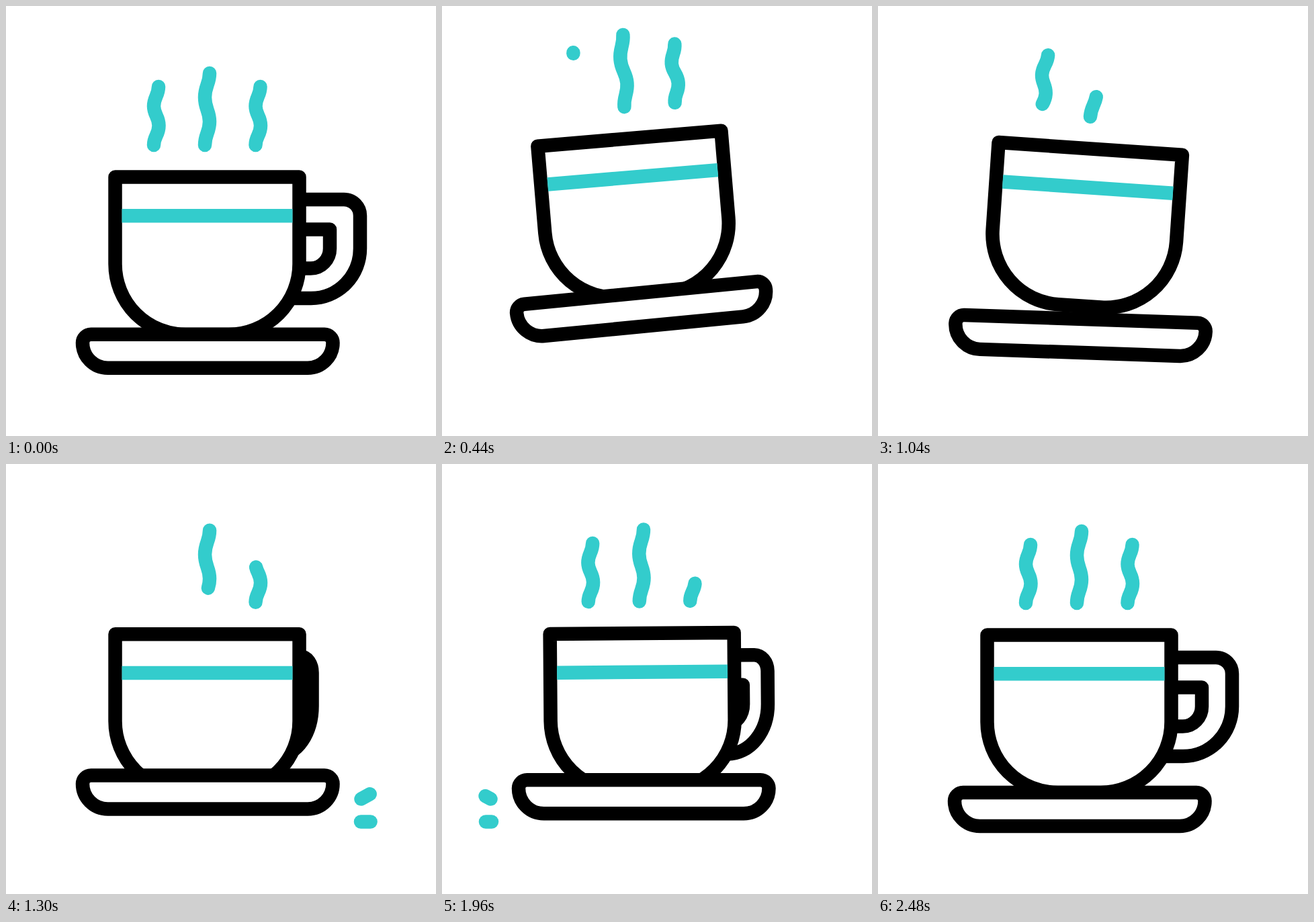
Animation, 640 px wide and 640 px high, one loop 3.02 s. Source, as an HTML page:

```html
<!DOCTYPE html>
<html lang="en">
<head>
<meta charset="utf-8">
<title>Bouncing cup</title>
<style>
  html, body { margin: 0; width: 100%; height: 100%; overflow: hidden; background: #fff; }
  svg { display: block; width: 100%; height: 100%; }
  path { fill: none; stroke-width: 20.5; stroke-linejoin: round; stroke-linecap: round; }
  .ink { stroke: #000; }
  .solid { fill: #fff; }
  .teal { stroke: #3cc; }
  .flat { stroke-linecap: butt; }
  #handle path { vector-effect: non-scaling-stroke; }
</style>
</head>
<body>
<svg viewBox="0 0 640 640">
  <g id="cup">
    <g id="handle" class="ink">
      <path d="M437 288H503a24 24 0 0 1 24 24V361a73 74 0 0 1 -73 74H420"/>
      <path d="M437 332.5H482V361a28.5 29.5 0 0 1 -28.5 29.5H430"/>
    </g>
    <path class="ink solid" d="M162.5 254.5H436.5V384a105 105 0 0 1 -105 105H267.5a105 105 0 0 1 -105 -105Z"/>
    <path class="teal flat" d="M172.5 312.3H426.5"/>
    <path class="teal steam" pathLength="1" d="M220 207C220 194 227.5 192 227.5 178S220 162 220 149S227 133 227 120"/>
    <path class="teal steam" pathLength="1" d="M296 207C296 191 303 188 303 172S296 153 296 136S303 116 303 100"/>
    <path class="teal steam" pathLength="1" d="M371.5 207C371.5 194 379 192 379 178S371.5 162 371.5 149S378.5 133 378.5 120"/>
  </g>
  <path id="saucer" class="ink solid" d="M126.5 489H474a12.5 12.5 0 0 1 12.5 12.5a37.5 37.5 0 0 1 -37.5 37.5H151.5a37.5 37.5 0 0 1 -37.5 -37.5a12.5 12.5 0 0 1 12.5 -12.5Z"/>
  <path class="teal right" pathLength="1" d="M528.5 498.5L565 478.5"/>
  <path class="teal right" pathLength="1" d="M528 532.5H568.5"/>
  <path class="teal left" pathLength="1" d="M72.5 498.5L36 478.5"/>
  <path class="teal left" pathLength="1" d="M74 532.5H32.5"/>
</svg>
<script>
  const LOOP = 3020, LAG = 110;
  const all = q => [...document.querySelectorAll(q)];
  const [cup, handle, saucer] = ['#cup', '#handle', '#saucer'].map(q => document.querySelector(q));
  const steam = all('.steam'), right = all('.right'), left = all('.left');
  const clamp = v => Math.max(0, Math.min(1, v));

  // start, peak, end, height, rise power, fall power
  const saucerHops = [[0, 600, 1145, 67, 2, 2], [1145, 1537, 1865, 40, 2, 3], [1865, 2035, 2290, 23, 2, 2]];
  const cupHops = [[110, 680, 1295, 65, 2.6, 2], [1295, 1660, 1968, 38.5, 2, 3], [1968, 2150, 2390, 23, 2, 2]];
  const tilts = [[0, 0], [410, -5.7], [810, 5.4], [1200, 0], [1300, 0], [1640, -4.1], [1910, 0], [1960, 0], [2120, 2], [2300, 0]];
  const spins = [[0, 0], [440, 62], [760, 161], [1300, 313], [1680, 380], [1960, 395], [2400, 360]];
  // erase, grow, erase, grow
  const puffs = [[190, 750, 1000, 1500], [450, 970, 1250, 1710], [700, 1150, 1440, 1885]];

  function hop(list, t) {
    const h = list.find(([a, , b]) => t >= a && t < b);
    if (!h) return 0;
    const [a, peak, b, height, up, down] = h;
    const off = t < peak ? ((peak - t) / (peak - a)) ** up : ((t - peak) / (b - peak)) ** down;
    return height * (1 - off);
  }

  function tilt(t) {
    if (t <= 0) return 0;
    const i = tilts.findIndex(k => k[0] > t);
    if (i < 0) return 0;
    const [[t0, v0], [t1, v1]] = [tilts[i - 1], tilts[i]];
    return v0 + (v1 - v0) * (0.5 - 0.5 * Math.cos(Math.PI * (t - t0) / (t1 - t0)));
  }

  // Cubic Hermite through the keys, flat at both ends
  function spin(t) {
    const i = spins.findIndex(k => k[0] > t);
    if (i < 0) return 360;
    const slope = j => !spins[j - 1] || !spins[j + 1] ? 0 :
      (spins[j + 1][1] - spins[j - 1][1]) / (spins[j + 1][0] - spins[j - 1][0]);
    const [[t0, v0], [t1, v1]] = [spins[i - 1], spins[i]];
    const d = t1 - t0, u = (t - t0) / d, w = 1 - u;
    return v0 * w * w * (1 + 2 * u) + v1 * u * u * (3 - 2 * u)
      + d * u * w * (slope(i - 1) * w - slope(i) * u);
  }

  function trim(path, from, to) {
    const len = to - from;
    path.style.visibility = len > 0.001 ? 'visible' : 'hidden';
    path.style.strokeDasharray = len > 0.999 ? 'none' : `${Math.max(len, 0.001)} 3`;
    path.style.strokeDashoffset = -from;
  }

  function puff(path, times, t) {
    let from = 0, to = 1;
    times.forEach((start, i) => {
      if (t < start) return;
      if (i % 2) { from = 0; to = clamp((t - start) / 250); }
      else { from = clamp((t - start) / 255); to = 1; }
    });
    trim(path, from, to);
  }

  function splash(paths, t) {
    paths.forEach(p => trim(p, clamp((t - 175) / 350), clamp(t / 350)));
  }

  function draw(t) {
    saucer.setAttribute('transform', `translate(0 ${-hop(saucerHops, t)}) rotate(${tilt(t)} 300 540)`);
    cup.setAttribute('transform', `translate(0 ${-hop(cupHops, t)}) rotate(${0.93 * tilt(t - LAG)} 300 499)`);
    const s = Math.cos(spin(t) * Math.PI / 180);
    handle.style.visibility = Math.abs(s) < 0.3 ? 'hidden' : 'visible';
    handle.setAttribute('transform', `translate(300 0) scale(${s} 1) translate(-300 0)`);
    steam.forEach((p, i) => puff(p, puffs[i], t));
    splash(right, t - 1175);
    splash(left, t - 1885);
  }

  const begin = performance.now();
  function tick() {
    draw((performance.now() - begin) % LOOP);
    requestAnimationFrame(tick);
  }
  tick();
</script>
</body>
</html>
```
